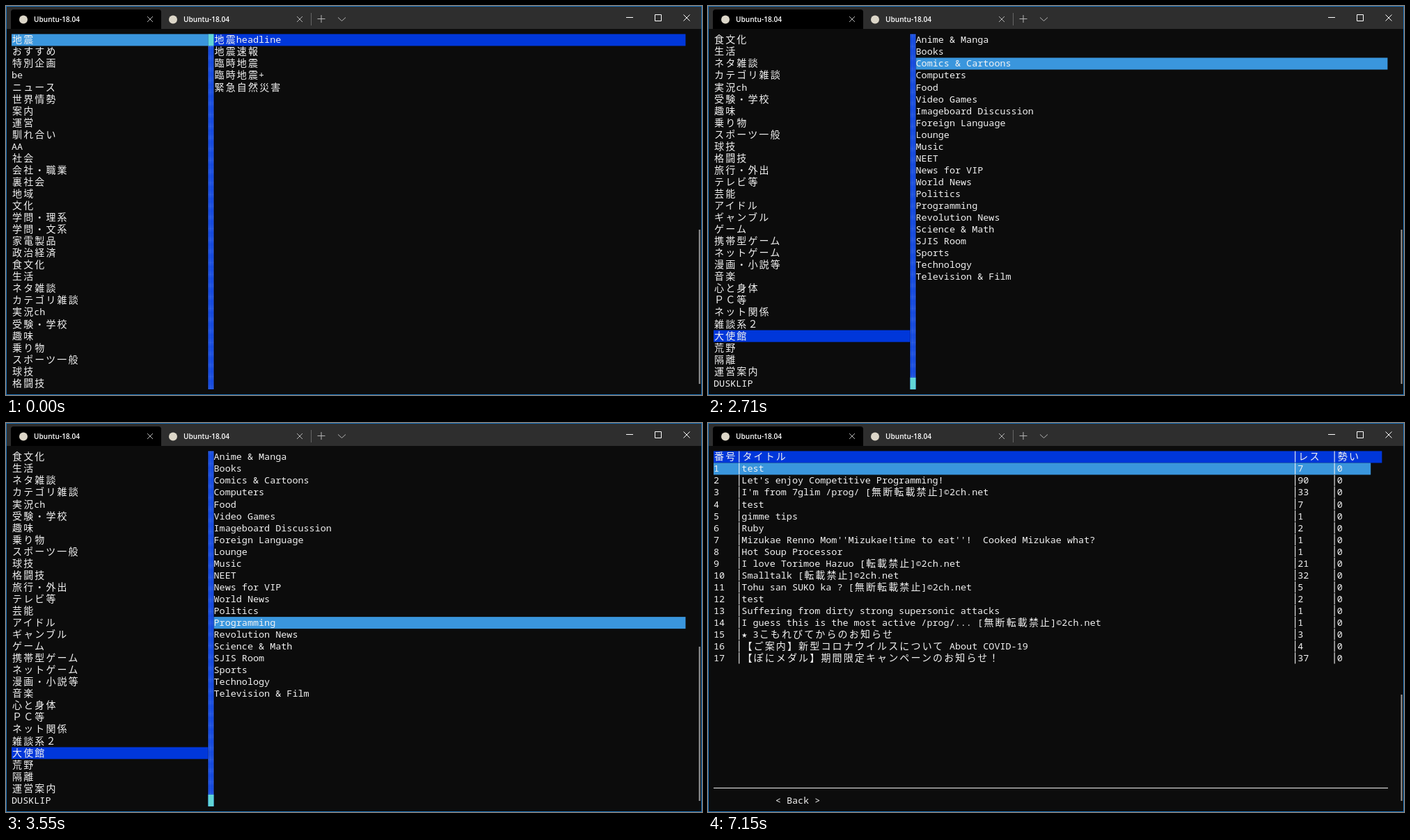
An HTML page for the animation above (8 s loop, 1000x560 px).

```html
<!DOCTYPE html>
<html lang="ja">
<head>
<meta charset="utf-8">
<title>Terminal board reader</title>
<style>
html, body { margin: 0; width: 100%; height: 100%; overflow: hidden; background: #0c0c0c; }
svg { display: block; width: 1000px; height: 560px; }
text { fill: #f2f2f2; white-space: pre; }
.mono { font: 500 13.45px "Noto Sans Mono", "DejaVu Sans Mono", monospace; }
.wide { font: 14px "Noto Sans CJK JP", "Noto Sans CJK", sans-serif; letter-spacing: 2.14px; }
.tab { font: 600 10.1px "Open Sans", "Noto Sans", sans-serif; fill: #fff; }
.line { fill: none; stroke: #f2f2f2; stroke-width: 1.1; }
.icon { fill: none; stroke: #fff; stroke-width: 1; }
.soft { stroke: #b4b4b4; }
.faint { stroke: #666; }
</style>
</head>
<body>
<svg viewBox="0 0 1000 560">
  <defs>
    <pattern id="shade" x="290.500" y="40.400" width="2.690" height="2.130" patternUnits="userSpaceOnUse">
      <rect width="2.690" height="2.130" fill="#0037da"/>
      <rect x=".8" y=".5" width="1" height="1" fill="#9cc0f5"/>
    </pattern>
  </defs>
  <rect width="1000" height="560" fill="#0c0c0c"/>
  <rect width="1000" height="33" fill="#2e2e2e"/>
  <path d="M7 33V9q0-4 4-4H219q4 0 4 4V33z" fill="#000"/>
  <circle cx="25" cy="19.500" r="6" fill="#dcd6c8"/>
  <circle cx="240" cy="19.500" r="6" fill="#dcd6c8"/>
  <text class="tab" x="40" y="23">Ubuntu-18.04</text>
  <text class="tab" x="255" y="23">Ubuntu-18.04</text>
  <path class="icon soft" d="M203 15l8 8m0-8l-8 8M418 15l8 8m0-8l-8 8M447.500 18.500h11m-5.500-5.500v11M477 16.500l5.500 5 5.500-5"/>
  <path class="icon faint" d="M438.500 10v18"/>
  <path class="icon" d="M891 16.500h10M932.500 12.500h9v9h-9zM973.500 12.500l9 9m0-9l-9 9"/>
  <g id="screen"></g>
  <rect x=".5" y=".5" width="999" height="559" fill="none" stroke="#1a6fb5"/>
</svg>
<script>
const CELL = 8.07, ROW = 17.05, LEFT = 8, TOP = 40.4, ROWS = 30;
const BLUE = "#0037da", LIGHT = "#3a96dd", CYAN = "#61d6d6";
const LOOP = 8000;

const categories = ("地震 おすすめ 特別企画 be ニュース 世界情勢 案内 運営 馴れ合い AA 社会 会社・職業 " +
  "裏社会 地域 文化 学問・理系 学問・文系 家電製品 政治経済 食文化 生活 ネタ雑談 カテゴリ雑談 実況ch " +
  "受験・学校 趣味 乗り物 スポーツ一般 球技 格闘技 旅行・外出 テレビ等 芸能 アイドル ギャンブル ゲーム " +
  "携帯型ゲーム ネットゲーム 漫画・小説等 音楽 心と身体 ＰＣ等 ネット関係 雑談系２ 大使館 荒野 隔離 " +
  "運営案内 DUSKLIP").split(" ");

const EMBASSY = 44, WILDS = 45, APART = 46, GUIDE = 47, LAST = 48;

const boards = {
  0: "地震headline,地震速報,臨時地震,臨時地震+,緊急自然災害",
  [EMBASSY]: "Anime & Manga,Books,Comics & Cartoons,Computers,Food,Video Games,Imageboard Discussion," +
    "Foreign Language,Lounge,Music,NEET,News for VIP,World News,Politics,Programming,Revolution News," +
    "Science & Math,SJIS Room,Sports,Technology,Television & Film",
  [WILDS]: "荒野,荒野の雑談,何でも掲示板の仮置き場,避難所",
  [APART]: "隔離,議論,相談,雑談",
  [GUIDE]: "削除依頼,批判要望",
  [LAST]: "総合headline,総合案内,初心者の質問,運営連絡,雑談,夜の雑談,夜更かしの友,恋愛相談,人生相談," +
    "創作文芸,小説・朗読,漫画,同人,絵画,写真,音声作品,ゲーム総合,携帯ゲーム,長編作品の感想紹介板+," +
    "お店情報,地域情報,北日本,東日本,西日本,仕事,健康,議論,実況,避難所,過去ログ"
};

const posts = [
  ["test", 7],
  ["Let's enjoy Competitive Programming!", 90],
  ["I'm from 7glim /prog/ [無断転載禁止]©2ch.net", 33],
  ["test", 7],
  ["gimme tips", 1],
  ["Ruby", 2],
  ["Mizukae Renno Mom''Mizukae!time to eat''!  Cooked Mizukae what?", 1],
  ["Hot Soup Processor", 1],
  ["I love Torimoe Hazuo [転載禁止]©2ch.net", 21],
  ["Smalltalk [転載禁止]©2ch.net", 32],
  ["Tohu san SUKO ka ? [無断転載禁止]©2ch.net", 5],
  ["test", 2],
  ["Suffering from dirty strong supersonic attacks", 1],
  ["I guess this is the most active /prog/... [無断転載禁止]©2ch.net", 1],
  ["★ 3こもれびてからのお知らせ", 3],
  ["【ご案内】新型コロナウイルスについて About COVID-19", 4],
  ["【ぽにメダル】期間限定キャンペーンのお知らせ！", 37]
].map(([title, count], i) => [i + 1, title, count]);

const colX = col => LEFT + col * CELL;
const rowY = row => TOP + row * ROW;
const escapeText = s => s.replace(/&/g, "&amp;").replace(/</g, "&lt;");
const rect = (x, y, w, h, fill) => `<rect x="${x}" y="${y}" width="${w}" height="${h}" fill="${fill}"/>`;
const bar = (from, to, row, fill, rows = 1) =>
  rect(colX(from), rowY(row), (to - from) * CELL, rows * ROW, fill);

// Places a string on the cell grid; CJK characters take two cells.
function put(col, row, value) {
  const runs = String(value).match(/[\u2e80-\uffef]+|★|[^\u2e80-\uffef★]+/g);
  return runs.map(run => {
    const wide = run.charCodeAt(0) >= 0x2e80;
    const x = colX(col) + (wide ? 1.07 : 0);
    col += run.length * (wide ? 2 : 1);
    return `<text class="${wide ? "wide" : "mono"}" x="${x}" y="${rowY(row) + 12.9}">${escapeText(run)}</text>`;
  }).join("");
}

const scrollbar = y => rect(995.5, y, 2, 544 - y, "#9a9a9a");

// Without a pick the focus is on the category list.
function boardView(cat, pick) {
  const first = cat < ROWS ? 0 : categories.length - ROWS;
  const onLeft = pick === undefined;
  return scrollbar(322) +
    bar(0, 35, cat - first, onLeft ? LIGHT : BLUE) +
    bar(36, 120, pick || 0, onLeft ? BLUE : LIGHT) +
    bar(35, 36, 0, "url(#shade)", ROWS) +
    bar(35, 36, first ? ROWS - 1 : 0, CYAN) +
    categories.slice(first, first + ROWS).map((name, i) => put(0, i, name)).join("") +
    boards[cat].split(",").map((name, i) => put(36, i, name)).join("");
}

function tableView(reversed) {
  const list = reversed ? [...posts].reverse() : posts;
  const cols = [0, 5, 104, 111];
  const rows = [["番号", "タイトル", "レス", "勢い"], ...list.map(p => [...p, 0])];
  const rules = [4, 103, 110].map(c =>
    `<path class="line" stroke-dasharray="16.2 ${ROW - 16.2}" d="M${colX(c + .5) + .4} ${TOP}V${rowY(18) - .6}"/>`);
  return scrollbar(391) +
    bar(0, 119, 0, BLUE) + bar(0, 117, 1, LIGHT) + rules.join("") +
    rows.map((cells, r) => cells.map((v, i) => put(cols[i], r, v)).join("")).join("") +
    `<path class="line" d="M8 525.500H977"/>` + put(11, 29, "< Back >");
}

const pick = (time, row) => [time, () => boardView(EMBASSY, row)];
const steps = [
  [0, () => boardView(0)],
  [750, () => boardView(LAST)],
  [1410, () => boardView(GUIDE)],
  [1590, () => boardView(APART)],
  [1720, () => boardView(WILDS)],
  [1870, () => boardView(EMBASSY)],
  pick(2020, 0), pick(2200, 1),
  pick(2710, 2), pick(2740, 3), pick(2770, 4), pick(2800, 5), pick(2840, 6),
  pick(2890, 8), pick(2940, 10), pick(3100, 11), pick(3250, 12),
  pick(3400, 13), pick(3550, 14),
  [4240, () => scrollbar(391)],
  [4290, () => tableView(false)],
  [5920, () => tableView(true)],
  [7150, () => tableView(false)]
];

const screenGroup = document.getElementById("screen");
const start = performance.now();
let shown = null;

function tick() {
  const t = Math.max(0, performance.now() - start) % LOOP;
  const step = steps.filter(s => s[0] <= t).pop();
  if (step !== shown) {
    shown = step;
    screenGroup.innerHTML = step[1]();
  }
  requestAnimationFrame(tick);
}
tick();
</script>
</body>
</html>
```
